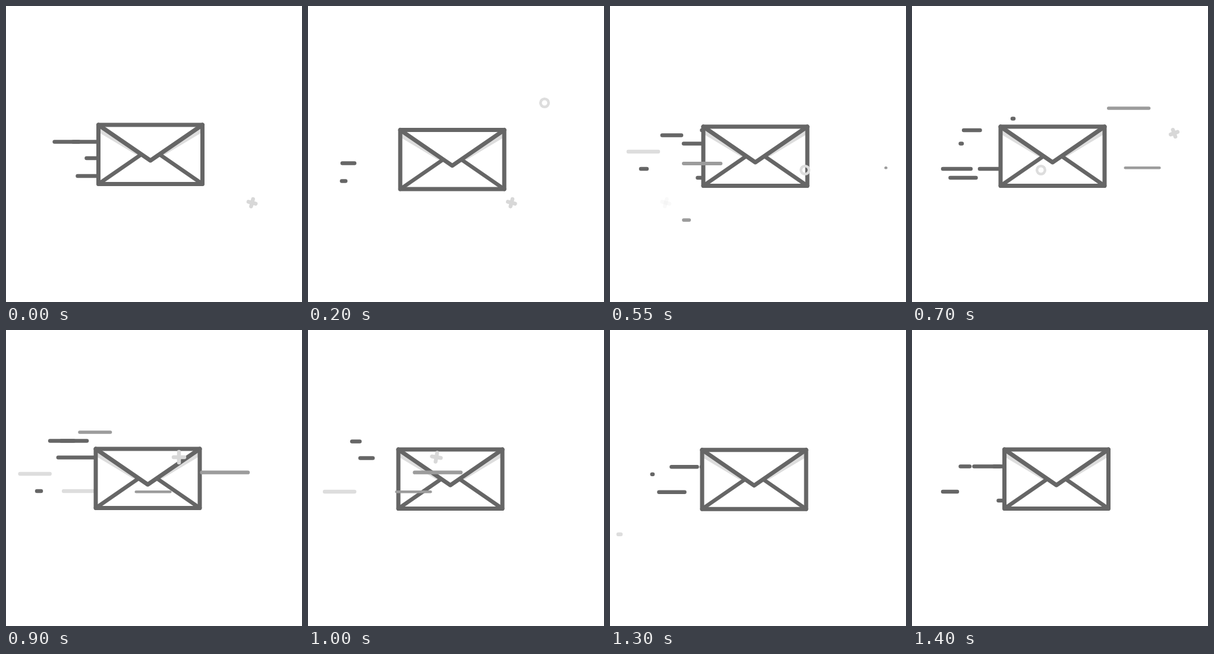
Write an HTML page with a canvas that moves like this. It is 498 px wide and 498 px high and loops after 1450 ms.

```html
<!DOCTYPE html>
<html lang="en">
<head>
<meta charset="utf-8">
<title>Flying envelope</title>
<style>
  html, body { margin: 0; width: 100%; height: 100%; overflow: hidden; background: #fff; }
  canvas { display: block; }
</style>
</head>
<body>
<canvas id="stage" width="498" height="498"></canvas>
<script>
const ctx = document.getElementById('stage').getContext('2d');
const LOOP = 1450, STEP = 50;
const DARK = '#666', GRAY = '#9c9c9c', LIGHT = '#ddd';
const WIDTH = 175, HEIGHT = 99.5;

// Drift of the envelope corner: [time, left, top]
const drift = [[0, 155.5, 200], [350, 155, 214], [550, 157, 203], [700, 149, 203],
  [900, 151, 200], [1150, 154, 203], [1400, 155.5, 201], [1450, 155.5, 200]];

// Streaks leaving the envelope; rows map a height below its top to start times
const trailEnd = row => 70 + 18 * Math.cos((row - 12) / 19);
const trails = [
  { color: LIGHT, speed: 0.7, length: 50, end: () => 14,
    rows: { 42: [370, 718], 71: [823], 142: [1033] } },
  { color: DARK, speed: 0.67, length: 49, end: trailEnd, rows: { 71: [335, 552] } },
  { color: DARK, speed: 0.5, length: 43, end: trailEnd,
    rows: { '-13.5': [696, 740], 6: [545], 14.5: [390, 737, 828], 28.5: [484, 1197, 1298, 1365],
      41: [1048], 56: [1410], 71: [630, 1155], 86: [210, 531, 1380] } },
];

const clamp = v => Math.max(0, Math.min(1, v));

function envelopeCorner(t) {
  const i = Math.max(1, drift.findIndex(key => key[0] >= t));
  const [t0, x0, y0] = drift[i - 1], [t1, x1, y1] = drift[i];
  const p = (1 - Math.cos(Math.PI * (t - t0) / (t1 - t0))) / 2;
  return [x0 + (x1 - x0) * p, y0 + (y1 - y0) * p];
}

function stroke(color, width, ...points) {
  ctx.strokeStyle = color;
  ctx.lineWidth = width;
  ctx.beginPath();
  points.forEach(([x, y]) => ctx.lineTo(x, y));
  ctx.stroke();
}

// The head runs left until it stops at `end`; the tail catches up with it.
function streak(age, x, y, { color, speed, length, end, width }) {
  const run = speed * ((age + LOOP) % LOOP);
  const tail = x - Math.max(0, run - length);
  if (tail >= end) stroke(color, width, [Math.max(end, x - run), y], [tail + 0.01, y]);
}

function drawTrails(t, left, top) {
  for (const group of trails)
    for (const [key, starts] of Object.entries(group.rows)) {
      const row = Number(key), x = row < 0 ? left + 22 : left;
      const style = { ...group, end: group.end(row), width: 6.5 };
      starts.forEach(start => streak(t - start, x, top + row, style));
    }
}

function drawWind(t, top) {
  const gusts = [[265, 296, 1.39], [172, 580, 1.115], [239.7, 810, 1.5],
    [272.3, 549, 0.7], [top + 157, 228, 1.25]];
  for (const [y, start, speed] of gusts)
    streak(t - start, 464.5, y,
      { color: GRAY, speed, length: 40 + 25 * speed, end: 124, width: 3 + 2.2 * speed });
}

function drawEnvelope(left, top) {
  ctx.save();
  ctx.translate(left, top);
  ctx.fillStyle = '#fff';
  ctx.fillRect(0, 0, WIDTH, HEIGHT);
  ctx.fillStyle = LIGHT;
  for (const side of [x => x, x => WIDTH - x]) {
    ctx.beginPath();
    [[3, 3], [3, 14], [63, 50], [76, 53]].forEach(([x, y]) => ctx.lineTo(side(x), y));
    ctx.fill();
    stroke(DARK, 6.5, [side(0), HEIGHT], [side(71), 50.5]);
  }
  stroke(DARK, 7, [0, 0], [WIDTH / 2, 60], [WIDTH, 0]);
  ctx.strokeRect(0, 0, WIDTH, HEIGHT);
  ctx.restore();
}

// Particles fade in at the right edge and out on the left.
function particle(x, y, draw) {
  ctx.save();
  ctx.globalAlpha = clamp((x - 85) / 60) * clamp((478 - x) / 25);
  ctx.translate(x, y);
  draw();
  ctx.restore();
}

function ring() {
  ctx.strokeStyle = LIGHT;
  ctx.lineWidth = 4.5;
  ctx.beginPath();
  ctx.arc(0, 0, 6.8, 0, 7);
  ctx.stroke();
}

function cross(degrees, arm) {
  ctx.rotate(degrees * Math.PI / 180);
  stroke('#d8d8d8', 6.5, [-arm, 0], [arm, 0]);
  stroke('#d8d8d8', 6.5, [0, -arm], [0, arm]);
}

function render(t) {
  const [left, top] = envelopeCorner(t);
  ctx.clearRect(0, 0, 498, 498);
  ctx.lineCap = ctx.lineJoin = 'round';
  drawTrails(t, left, top);
  drawEnvelope(left, top);
  drawWind(t, top);

  particle(263 - 0.9 * (t - 350), 163, ring);
  particle(328 - 0.74 * (t - 550), 276, ring);
  particle(414 - 164 * (t / 350) ** 1.48, 331, () => cross(15, 6.3));
  particle(291 - 0.75 * (t - 900), 214,
    () => cross((t - 900) / 10, 9 - Math.abs(t - 900) / 70));
}

function frame() {
  render(Math.floor(performance.now() % LOOP / STEP) * STEP);
  requestAnimationFrame(frame);
}
frame();
</script>
</body>
</html>
```
